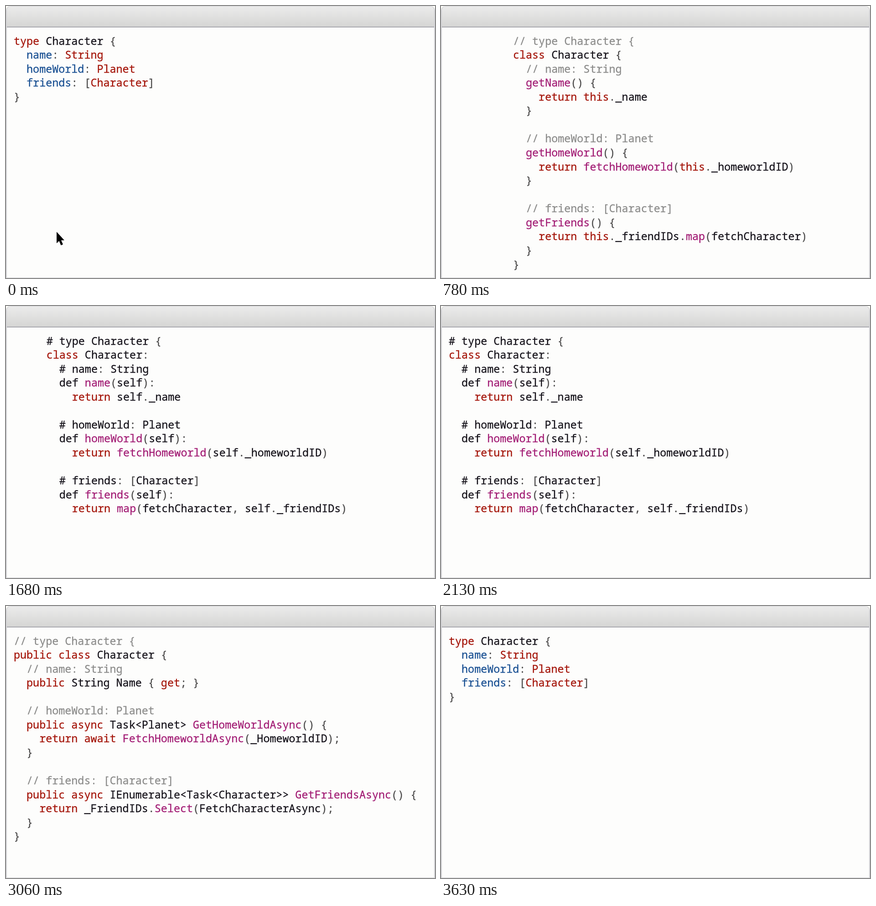
These frames come from a looping animation (941x595 px, 3660 ms). An HTML page:

```html
<!DOCTYPE html>
<html lang="en">
<head>
<meta charset="utf-8">
<title>Code slides</title>
<style>
html, body { margin: 0; width: 100%; height: 100%; overflow: hidden; background: #fcfcf8; }
#window {
  position: absolute; left: 0; top: 0; width: 941px; height: 595px; box-sizing: border-box;
  border: solid #d3d3d6; border-width: 1px 2px 1px; border-radius: 10px 10px 0 0;
  background: #fdfdfc; overflow: hidden;
}
#bar {
  height: 44px; border-bottom: 2px solid #a9a9b0;
  background: linear-gradient(#ebebeb, #d5d5d4);
}
#strip { position: absolute; left: 0; top: 59.5px; display: flex; }
pre {
  flex: none; width: 936px; box-sizing: border-box; margin: 0; padding-left: 15px;
  font: 500 23.4px/30.56px "Noto Sans Mono", "DejaVu Sans Mono", monospace;
  font-variant-ligatures: none; color: #15121a; -webkit-text-stroke: .3px;
}
.comment { color: #8b8b8a; }
.keyword, .kind { color: #a41409; }
.field { color: #184f92; }
.call { color: #a21c74; }
.mark { color: #4c4b4b; }
#cursor { position: absolute; left: 0; top: 0; }
</style>
</head>
<body>
<div id="window">
  <div id="bar"></div>
  <div id="strip"></div>
</div>
<svg id="cursor" width="941" height="595">
  <path d="M111 494v25l5.5-5 4 9.5 4.5-2-4-9h7z" stroke="#fff" stroke-width="2.5" paint-order="stroke"/>
</svg>
<script>
const slides = [
`type Character {
  name: String
  homeWorld: Planet
  friends: [Character]
}`,
`// type Character {
class Character {
  // name: String
  getName() {
    return this._name
  }

  // homeWorld: Planet
  getHomeWorld() {
    return fetchHomeworld(this._homeworldID)
  }

  // friends: [Character]
  getFriends() {
    return this._friendIDs.map(fetchCharacter)
  }
}`,
`# type Character {
class Character:
  # name: String
  def name(self):
    return self._name

  # homeWorld: Planet
  def homeWorld(self):
    return fetchHomeworld(self._homeworldID)

  # friends: [Character]
  def friends(self):
    return map(fetchCharacter, self._friendIDs)`,
`// type Character {
public class Character {
  // name: String
  public String Name { get; }

  // homeWorld: Planet
  public async Task<Planet> GetHomeWorldAsync() {
    return await FetchHomeworldAsync(_HomeworldID);
  }

  // friends: [Character]
  public async IEnumerable<Task<Character>> GetFriendsAsync() {
    return _FriendIDs.Select(FetchCharacterAsync);
  }
}`];

const rules = new RegExp([
  String.raw`(?<comment>\/\/.*)`,
  String.raw`(?<field>(?<=^  )\w+(?=:))`,
  String.raw`(?<kind>(?<=^  \w+: \[?)\w+)`,
  String.raw`(?<keyword>(?<!# )\b(?:type|class|return|this|public|async|await|get)\b)`,
  String.raw`(?<call>\w+(?=\())`,
  String.raw`(?<mark>[{}()[\]:;.,]+)`,
  '<'
].join('|'), 'gm');

function highlight(code) {
  return code.replace(rules, (text, ...rest) => {
    const groups = rest.at(-1);
    const name = Object.keys(groups).find(key => groups[key]);
    return name ? `<span class="${name}">${text}</span>` : '&lt;';
  });
}

const LOOP = 3660, SLIDE_TIME = 250, SLIDE_WIDTH = 936, CURSOR_TIME = 300;
const starts = [643, 1515, 2390, 3381];
const strip = document.getElementById('strip');
const cursor = document.getElementById('cursor');
strip.innerHTML = [...slides, slides[0]].map(code => `<pre>${highlight(code)}</pre>`).join('');

// Cubic Bezier (.25, .1, .25, 1), solved by bisection.
function ease(x) {
  if (x <= 0 || x >= 1) return x <= 0 ? 0 : 1;
  let low = 0, high = 1, s;
  for (let i = 0; i < 20; i++) {
    s = (low + high) / 2;
    if (.75 * s * (1 - s) + s ** 3 < x) low = s; else high = s;
  }
  return .3 * s * (1 - s) ** 2 + 3 * s * s * (1 - s) + s ** 3;
}

function draw() {
  const time = performance.now() % LOOP;
  const position = starts.reduce((sum, start) => sum + ease((time - start) / SLIDE_TIME), 0);
  strip.style.transform = `translateX(${-position * SLIDE_WIDTH}px)`;
  cursor.style.display = time < CURSOR_TIME ? '' : 'none';
  requestAnimationFrame(draw);
}
draw();
</script>
</body>
</html>
```
